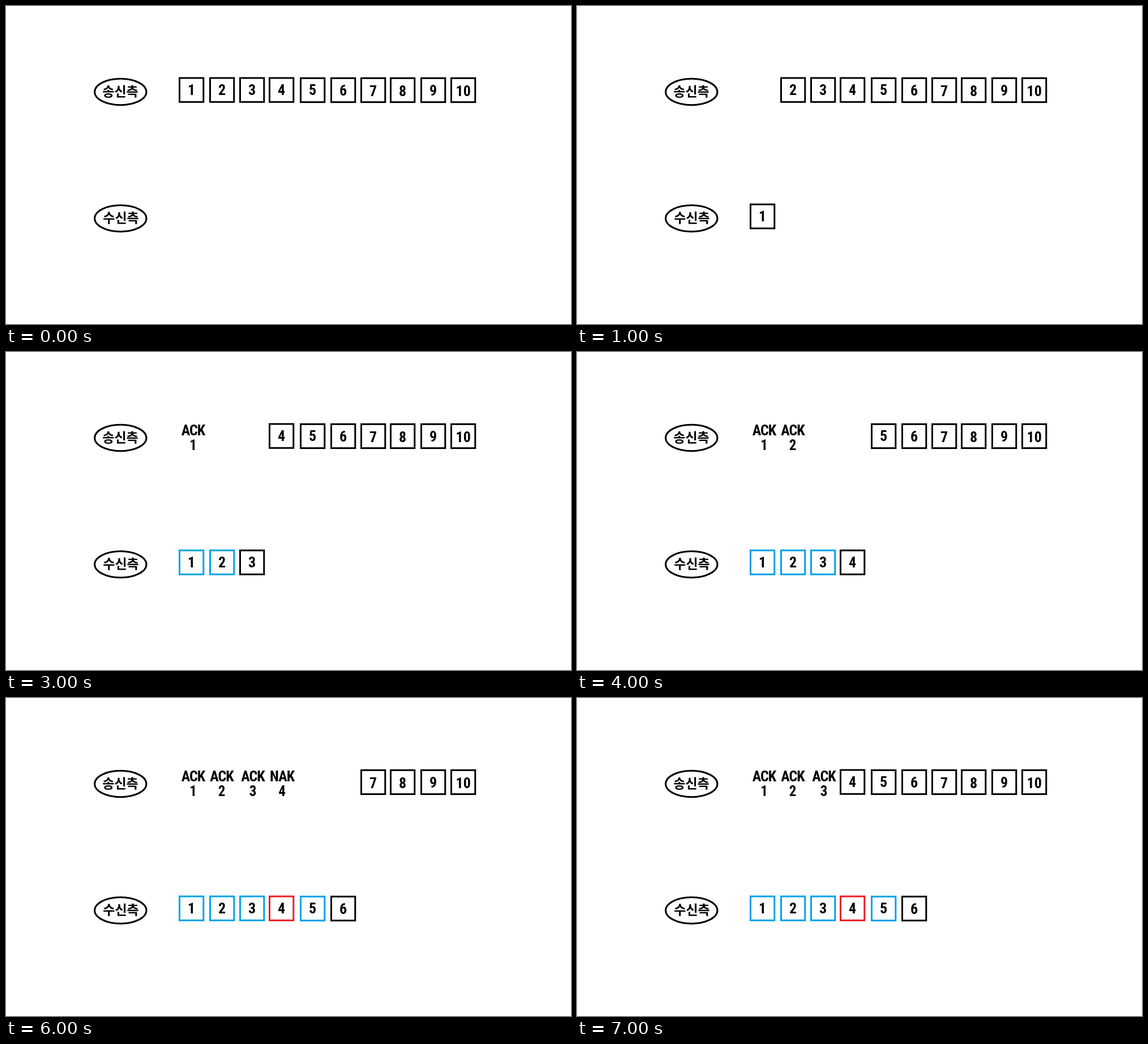
These frames come from a looping animation (998x561 px, 8000 ms). An HTML page:

```html
<!DOCTYPE html>
<html lang="ko">
<head>
<meta charset="utf-8">
<title>ARQ</title>
<style>
html, body { margin: 0; width: 100%; height: 100%; overflow: hidden; background: #fff; }
svg { display: block; width: 100vw; height: 100vh; }
text {
  font-family: "Roboto Condensed", "Liberation Sans Narrow", Roboto, sans-serif;
  font-stretch: 75%; font-weight: 700; text-anchor: middle; fill: #000;
}
.side { font: 900 23px "Noto Sans CJK KR", "Noto Sans CJK", sans-serif; }
rect, ellipse { fill: none; stroke: #000; stroke-width: 3; }
</style>
</head>
<body>
<svg id="stage" viewBox="0 0 998 561"></svg>
<script>
const LOOP = 8000, STEP = 1000, DROP = 223;
const BLUE = '#00a2e8', RED = '#ed1c24', BLACK = '#000';
const BAD = 4;
const boxX = [305, 359, 412, 464, 519, 573, 626, 678, 732, 785];
const numY = [156.5, 156.5, 156.5, 156.5, 157, 158, 159, 158.5, 158, 158.5];
const replyX = [330.5, 381, 436, 487.5];
const stage = document.getElementById('stage');

function add(parent, tag, attrs, label) {
  const el = document.createElementNS('http://www.w3.org/2000/svg', tag);
  for (const k in attrs) el.setAttribute(k, attrs[k]);
  if (label !== undefined) el.textContent = label;
  parent.appendChild(el);
  return el;
}

function side(y, name, x, baseline) {
  add(stage, 'ellipse', { cx: 202.3, cy: y, rx: 45.7, ry: 23.2 });
  add(stage, 'text', { x, y: baseline, class: 'side' }, name);
}

function packet(i, dy) {
  const g = add(stage, 'g', { transform: `translate(0 ${dy})` });
  const top = i < 4 ? 127 : 127.3;
  const rect = add(g, 'rect', { x: boxX[i] + 1.5, y: top, width: 42.3, height: 42.3 });
  add(g, 'text', { x: boxX[i] + 22.7, y: numY[i], 'font-size': 26 }, i + 1);
  return { g, rect };
}

function reply(x, i) {
  const g = add(stage, 'g', {});
  const word = add(g, 'text', { x, y: 147, 'font-size': 26, 'letter-spacing': -1 },
    i + 1 === BAD ? 'NAK' : 'ACK');
  // keep neighbouring words apart
  const w = word.getComputedTextLength();
  if (w > 43) word.setAttribute('font-size', 26 * 43 / w);
  add(g, 'text', { x, y: 173.3, 'font-size': 25 }, i + 1);
  return g;
}

side(151.5, '송신측', 202, 158.5);
side(374.7, '수신측', 203, 382);
const sent = boxX.map((_, i) => packet(i, 0));
const got = boxX.slice(0, 6).map((_, i) => packet(i, DROP));
const replies = replyX.map(reply);

const show = (el, on) => el.setAttribute('visibility', on ? 'visible' : 'hidden');

function render(t) {
  const step = Math.floor(t % LOOP / STEP);
  const rewound = step === 7;
  const count = Math.min(step, 6);
  const gone = rewound ? BAD - 1 : count;
  const answered = rewound ? BAD - 1 : count - 2;

  sent.forEach((p, i) => show(p.g, i >= gone));
  got.forEach((p, i) => {
    const checked = i < count - 1;
    show(p.g, i < count);
    p.rect.style.stroke = !checked ? BLACK : i + 1 === BAD ? RED : BLUE;
  });
  replies.forEach((g, i) => show(g, i < answered));
}

function tick() {
  render(performance.now());
  requestAnimationFrame(tick);
}
tick();
</script>
</body>
</html>
```
